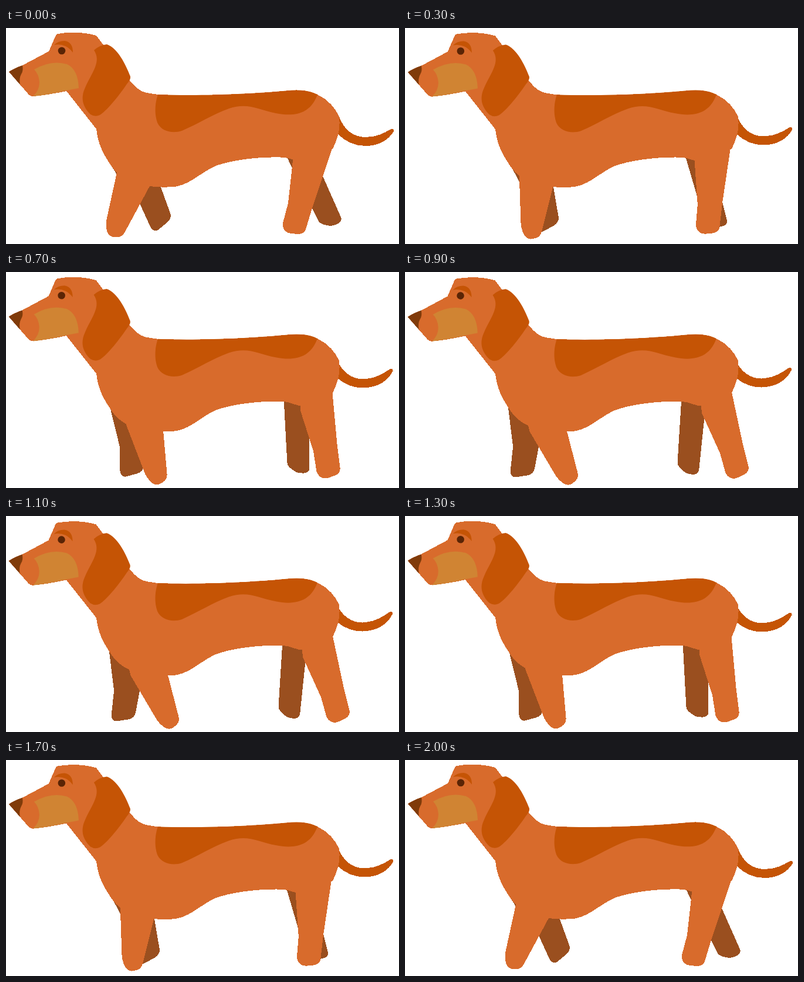
Recreate the animation shown at these times as an HTML page. Size 670 by 370 pixels, loop 2100 ms.

```html
<!DOCTYPE html>
<html lang="en">
<head>
<meta charset="utf-8">
<title>Walking dog</title>
<style>
  html, body { margin: 0; width: 100%; height: 100%; overflow: hidden; background: #fff; }

  /* --p is the stride: 0 to 1 and back, in ticks of 100 ms */
  @property --p { syntax: "<number>"; inherits: true; initial-value: 0; }
  @keyframes stride {
    0%, 95.238%, 100% { --p: 0; }
    47.619% { --p: 1; }
  }

  svg {
    display: block; width: 670px; height: 370px;
    animation: stride 2100ms steps(10) infinite;
  }

  .coat { fill: #d86b2c; }
  .dark { fill: #c55405; }
  .far { fill: #9a4f1f; }
  .nose { fill: #803b0a; }
  .cheek { fill: #d08433; }
  .eye { fill: #5a2405; }
  .coat, .far, .tail { shape-rendering: crispEdges; }

  .turn { transform: rotate(calc(var(--p) * var(--arc))); }
  .torso { --arc: -.22deg; transform-origin: 560px 170px; }
  .tail { --arc: -6.6deg; transform-origin: 567px 190px; }

  /* A leg swings about its hip and lifts in mid-stride, so the foot stays level */
  .leg {
    transform:
      translateY(calc(var(--p) * (var(--p) - 1) * var(--lift)))
      rotate(calc(var(--p) * var(--arc)));
  }
  .near-front { --arc: -47.5deg; --lift: 36px; transform-origin: 244px 231px; }
  .near-rear { --arc: -34deg; --lift: 24px; transform-origin: 531px 204px; }
  .far-front { --arc: 34deg; --lift: 21px; transform-origin: 210px 220px; }
  .far-rear { --arc: 33deg; --lift: 22px; transform-origin: 503px 201px; }
</style>
</head>
<body>
<svg viewBox="0 0 670 370">
  <path class="far leg far-front" d="M179 235L189 251L229 303L245 338Q250 350 259 346L275 333Q283 326 280 317L263 270L245 220Z"/>
  <path class="far leg far-rear" d="M470 203L523 311L533 331Q536 337 554 339Q575 335 571 324L541 256L521 210Z"/>
  <path class="dark turn tail" d="M552 135L568 152C576 174 592 187 613 187C632 187 644 180 655 174Q661 171 661 177C652 192 636 202 613 202C595 202 579 195 566 182L550 172Z"/>
  <g class="turn torso">
    <path class="coat" d="M88 10Q122 4 154 13L166 29L211 90C222 102 228 110 246 112L259 114C330 117 420 113 478 107.500C500 105 518 107 531 114C550 123 562 138 568 152C570 172 567 186 557 207L520 226L500 229L487 225Q480 222 468 221.500C430 220.500 385 226 357 236.300C330 249 315 267 290 271.500Q270 274 245 271Q222 269 204 259Q188 250 178 234C164 213 157 198 154 173L103 108Q70 115 46 117Q41 117 37 112L5 75Q14 69 28 64L73 40L83 17Q85 11 88 10Z"/>
    <path class="dark" d="M259 114C330 117 420 113 478 107.500C500 105 518 107 531 114C520 145 495 153 460 146C430 140 412 127 380 138C350 149 330 163 300 176C285 181 265 178 258 162C252 145 255 125 259 114Z"/>
    <path class="cheek" d="M48 71Q77 54 104 62Q123 71 124 103L103 107Q70 115 46 117Q57 107 57 93Q56 79 48 71Z"/>
    <path class="nose" d="M5 75Q14 69 28 64Q30 73 26 79Q22 86 24 97Z"/>
    <path class="dark" d="M82 29Q89 22 100 22Q114 24 114 42Q108 34 101 31Q93 27 82 29Z"/>
    <circle class="eye" cx="95" cy="39" r="6.300"/>
    <path class="dark" d="M150 38Q160 29 172 28C190 34 204 62 212 83Q213 88 206 96C190 120 170 143 160 149Q152 153 144 148C130 134 127 119 135 102C147 75 163 58 150 38Z"/>
  </g>
  <path class="coat leg near-front" d="M200 225L190 243L171 330Q169 357 184 358L188 358Q198 359 203 349L246 269L270 225Z"/>
  <path class="coat leg near-rear" d="M500 200L489 227L481 300L472 334Q471 350 486 352L498 353Q508 353 511 345L523 305L556 207Z"/>
</svg>
</body>
</html>
```
